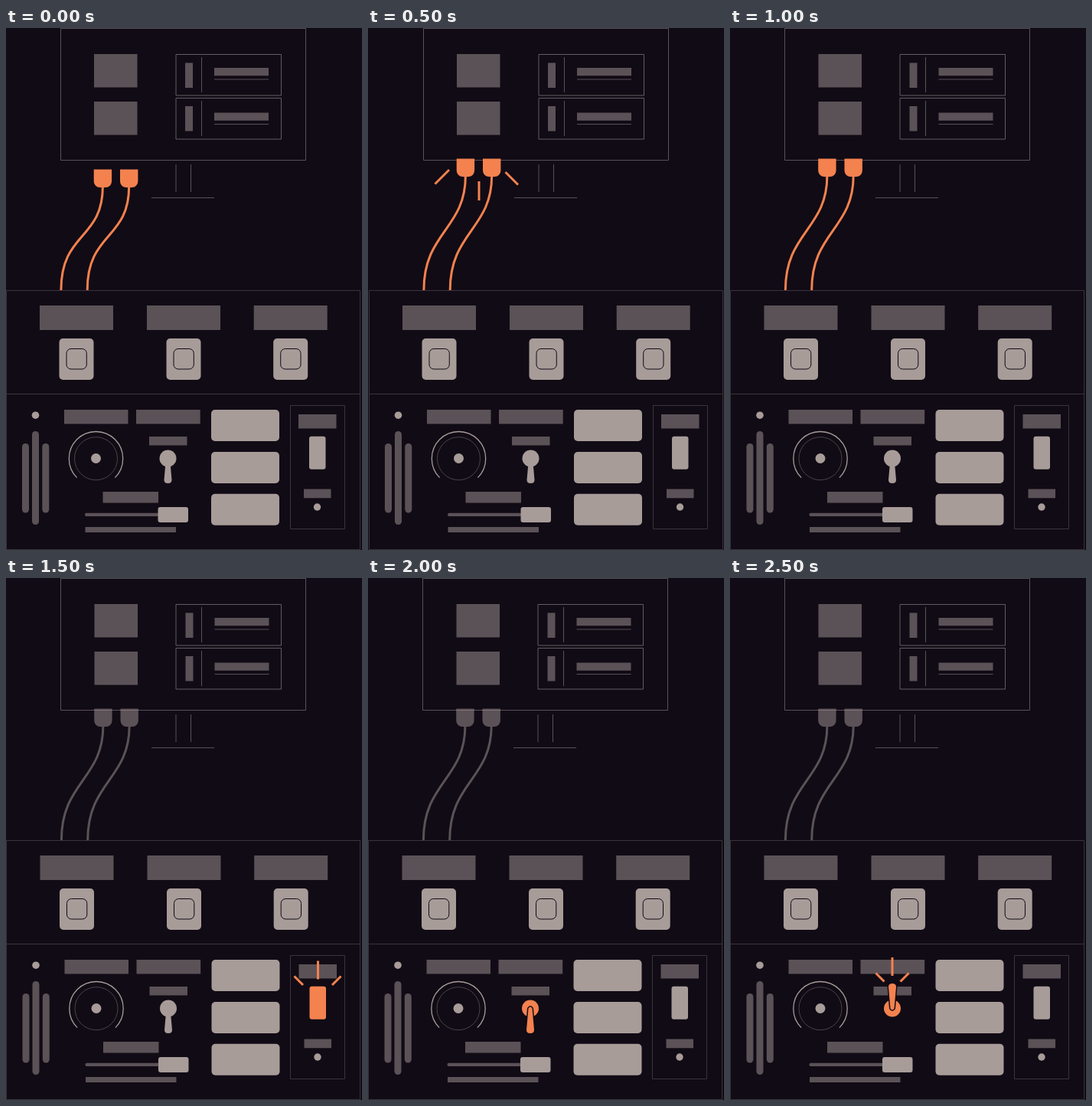
Animation, 465 px wide and 681 px high, one loop 3000 ms. Source, as an HTML page with a canvas:

```html
<!DOCTYPE html>
<html lang="en">
<head>
<meta charset="utf-8">
<title>Control panel</title>
<style>
  html, body { margin: 0; width: 100%; height: 100%; overflow: hidden; background: #110b15; }
  canvas { display: block; }
</style>
</head>
<body>
<canvas id="stage" width="465" height="681"></canvas>
<script>
const ctx = document.getElementById('stage').getContext('2d');
const BG = '#110b15', DARK = '#5b5257', LIGHT = '#a89c99', ORANGE = '#f4824f';
const OUTLINE = '#5a5158', FAINT = '#3b343b';
const STEP = 500, STEPS = 6;

function box(x, y, w, h, color = DARK, radius = 0) {
  ctx.fillStyle = color;
  ctx.beginPath();
  ctx.roundRect(x, y, w, h, radius);
  ctx.fill();
}

function frame(x, y, w, h, color = OUTLINE, radius = 0) {
  ctx.strokeStyle = color;
  ctx.lineWidth = 1;
  ctx.beginPath();
  ctx.roundRect(x, y, w, h, radius);
  ctx.stroke();
}

function line(x1, y1, x2, y2, color = OUTLINE, width = 1) {
  ctx.strokeStyle = color;
  ctx.lineWidth = width;
  ctx.beginPath();
  ctx.moveTo(x1, y1);
  ctx.lineTo(x2, y2);
  ctx.stroke();
}

function dot(x, y, r, color = LIGHT) {
  ctx.fillStyle = color;
  ctx.beginPath();
  ctx.arc(x, y, r, 0, Math.PI * 2);
  ctx.fill();
}

function arc(x, y, r, from, to, color, width) {
  ctx.strokeStyle = color;
  ctx.lineWidth = width;
  ctx.beginPath();
  ctx.arc(x, y, r, from, to);
  ctx.stroke();
}

const spark = (...ends) => line(...ends, ORANGE, 3);

function shifted(dx, draw) {
  ctx.save();
  ctx.translate(dx, 0);
  draw();
  ctx.restore();
}

function drawOutlines() {
  frame(71.5, 0.5, 320, 172);
  for (const y of [34.5, 91.5]) {
    frame(222, y, 137.5, 53.5, '#655c62');
    line(255.5, y + 3.5, 255.5, y + 49.5);
  }
  line(222, 178, 222, 214);
  line(241.5, 178, 241.5, 214);
  line(190, 221.5, 272, 221.5);
  frame(0.5, 342.5, 462, 338, FAINT);
  line(0, 477.5, 463, 477.5, FAINT);
  frame(371.5, 492.5, 71, 161, FAINT);
}

function drawMonitorContent() {
  for (const y of [34, 96]) box(115, y, 56.5, 43.5);
  for (const y of [45.5, 102]) box(234, y, 10, 32.5);
  for (const y of [52, 110.5]) {
    box(272, y, 71, 10.3);
    line(272, y + 15, 343, y + 15);
  }
}

function drawPlug(x, top, color) {
  ctx.strokeStyle = color;
  ctx.lineWidth = 3;
  ctx.beginPath();
  ctx.moveTo(x, top + 22);
  ctx.bezierCurveTo(x, top + 92, x - 54.5, 266, x - 54.5, 342);
  ctx.stroke();
  box(x - 11.7, top, 23.4, 23.5, color, [0, 0, 8, 8]);
}

function drawUpperPanel() {
  for (const x of [44, 184, 323.7]) {
    box(x, 362, 96, 32);
    box(x + 25.5, 405, 45, 54, LIGHT, 5);
    frame(x + 35, 418.5, 26.3, 26.5, BG, 6);
  }
}

function drawKey(up, color, outlined) {
  dot(211.5, 561.5, 11, color);
  ctx.save();
  ctx.translate(211.5, 561.5);
  if (up) ctx.scale(1, -1);
  ctx.beginPath();
  ctx.moveTo(-2.5, 0);
  ctx.quadraticCurveTo(0, -4, 2.5, 0);
  ctx.lineTo(5, 28);
  ctx.quadraticCurveTo(5, 32.5, 0, 32.5);
  ctx.quadraticCurveTo(-5, 32.5, -5, 28);
  ctx.closePath();
  if (outlined) {
    ctx.strokeStyle = BG;
    ctx.lineWidth = 3;
    ctx.stroke();
  }
  ctx.fillStyle = color;
  ctx.fill();
  ctx.restore();
}

function drawLowerPanel(step) {
  dot(38.5, 505.2, 4.8);
  box(21, 542, 9, 90.5, DARK, 4.5);
  box(34, 526, 9, 122, DARK, 4.5);
  box(47.3, 542, 9, 90.5, DARK, 4.5);

  box(76, 498, 83.5, 18.5);
  box(170, 498, 83.7, 18.5);
  arc(117.5, 561.7, 35.2, Math.PI * 0.75, Math.PI * 2.25, LIGHT, 1.3);
  arc(117.5, 561.7, 28, 0, Math.PI * 2, '#4b4349', 1);
  dot(117.5, 561.5, 6.5);

  box(187, 533, 49.5, 11.5);
  const keyLit = step >= 4;
  drawKey(step === 5, keyLit ? ORANGE : LIGHT, keyLit);

  box(126.5, 605, 72.5, 14.5);
  box(103, 632.7, 97, 4.3, DARK, 2);
  box(198.5, 625, 39.5, 20, LIGHT, 3);
  box(103.5, 651, 118.5, 7);

  for (const y of [498, 553, 607.7]) box(268, y, 89, 41, LIGHT, 5);

  box(382, 504, 49.5, 18.5);
  box(396, 532.7, 21.5, 43, step === 3 ? ORANGE : LIGHT, 3);
  box(389, 601.5, 35.5, 11.7);
  dot(406.5, 625, 4.7);
}

function drawSparks(step) {
  if (step === 1) {
    spark(106, 185, 87.5, 203.5);
    spark(145, 200, 145, 225);
    spark(179.5, 188, 196, 204.5);
  } else if (step === 3) {
    spark(376.5, 519.5, 388, 531);
    spark(407.5, 499.5, 407.5, 523.5);
    spark(437.5, 519.5, 426, 531);
  } else if (step === 5) {
    spark(190.5, 515.5, 201.5, 526.5);
    spark(212, 495, 212, 519);
    spark(233.5, 515.5, 222.5, 526.5);
  }
}

function render(now) {
  const step = Math.floor(now / STEP) % STEPS;
  const nudge = [0, 1, 0.5, 0.5, 0.5, 0.5][step];
  const plugTop = step === 0 ? 184.5 : 170.5;
  const plugColor = step < 3 ? ORANGE : DARK;

  ctx.fillStyle = BG;
  ctx.fillRect(0, 0, 465, 681);
  shifted(Math.floor(nudge), drawOutlines);
  shifted(nudge, () => {
    drawMonitorContent();
    drawPlug(126.4, plugTop, plugColor);
    drawPlug(160.7, plugTop, plugColor);
    drawUpperPanel();
    drawLowerPanel(step);
  });
  if (step >= 3) {
    line(115, 172.5, 139, 172.5, '#806f74');
    line(149, 172.5, 173, 172.5, '#806f74');
  }
  drawSparks(step);
}

let start;
function tick(now) {
  start ??= now;
  render(now - start);
  requestAnimationFrame(tick);
}
requestAnimationFrame(tick);
</script>
</body>
</html>
```
